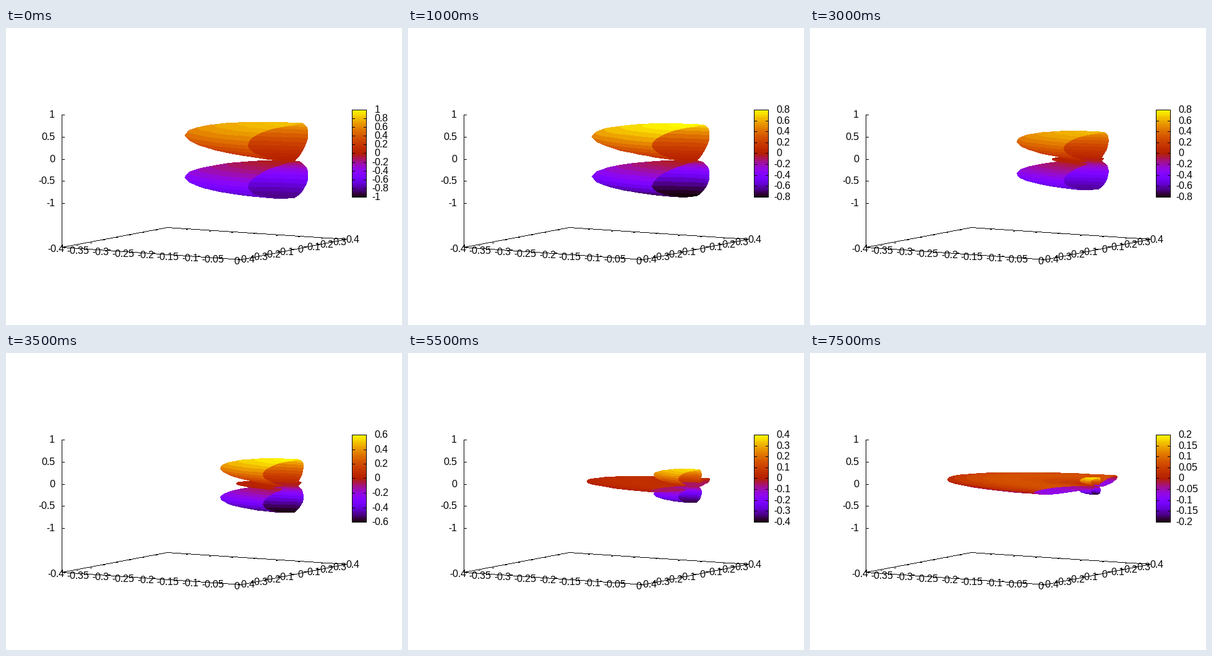
Write a matplotlib script that moves like this. It is 640 px wide and 480 px high and loops after 8 s.

```python
import numpy as np
import matplotlib.pyplot as plt
from matplotlib.animation import FuncAnimation
from matplotlib.collections import LineCollection, PolyCollection

W, H, DPI = 640, 480, 80
PX = 72 / DPI
FRAMES, PERIOD = 16, 40
BAR_X0, BAR_X1, BAR_TOP, BAR_BOT = 559, 582, 132, 273

plt.rcParams["font.family"] = "Liberation Sans"
plt.rcParams["font.size"] = 16 * PX
plt.rcParams["text.hinting"] = "no_autohint"
plt.rcParams["text.hinting_factor"] = 1

fig = plt.figure(figsize=(W / DPI, H / DPI), dpi=DPI, facecolor="white")
ax = fig.add_axes([0, 0, 1, 1])
ax.axis("off")


def project(x, y, z):
    """Orthographic view of x in [-0.4, 0], y in [-0.4, 0.4], base at z = -2."""
    u, v = (x + 0.4) / 0.4, (y + 0.4) / 0.8
    return np.stack([90 + 290 * u + 170 * v,
                     354.4 + 19.4 * u - 32.7 * v - 71.33 * (z + 2)], axis=-1)


def palette(g):
    g = np.clip(g, 0, 1)
    return np.stack([np.sqrt(g), g ** 3,
                     np.clip(np.sin(2 * np.pi * g), 0, 1)], axis=-1)


def dots(lines):
    """One short dash per pixel along each line, for crisp stepped strokes."""
    pts = []
    for a, b in np.round(lines):
        n = int(np.abs(b - a).max()) + 1
        pts.append(np.round(a + np.linspace(0, 1, n)[:, None] * (b - a)))
    return np.concatenate(pts)[:, None, :] + [[0.3, 0.5], [0.7, 0.5]]


def strokes(lines):
    return ax.add_collection(LineCollection(
        dots(lines), colors="black", linewidths=0.2 * PX,
        antialiased=False, snap=False, zorder=3))


def label(value, x, y, align):
    """Number with a leading blank in place of a missing minus sign."""
    text = f"{value:g}"
    if value >= 0:
        x += {"left": 4.4, "center": 2.2, "right": 0}[align]
    return ax.text(x, y, text, ha=align, va="baseline")


def outline(corners):
    return [[p, corners[(i + 1) % 4]] for i, p in enumerate(corners)]


def draw_axes():
    corners = [project(x, y, -2) for x, y in
               ((-0.4, -0.4), (0, -0.4), (0, 0.4), (-0.4, 0.4))]
    lines = outline(corners)
    lines.append([corners[0], project(-0.4, -0.4, 1)])

    for x in np.arange(-8, 1) * 0.05:
        for y, step in ((-0.4, 5), (0.4, -5)):
            p = project(x, y, -2)
            lines.append([p, p + [step, -0.19 * step]])
        px, py = project(x, -0.4, -2)
        label(round(x, 2), px - 9.5, py + 8, "center")

    for y in np.arange(-4, 5) * 0.1:
        for x, step in ((0, -5), (-0.4, 5)):
            p = project(x, y, -2)
            lines.append([p, p + [step, 0.07 * step]])
        px, py = project(0, y, -2)
        label(round(y, 1), px + 8.5, py + 5.5, "center")

    for z in (-1, -0.5, 0, 0.5, 1):
        p = project(-0.4, -0.4, z)
        lines.append([p, p + [4, 0]])
        label(z, 79, p[1] + 5, "right")
    strokes(np.array(lines))


# Spherical grid, 9 degree meridians ordered from back to front
phi = np.radians(np.arange(99, 262, 9))[:, None]
theta = np.radians(np.linspace(180, 0, 42))[None, :]
q = np.sqrt(5) * (3 * np.cos(theta) ** 2 - 1) / 2


def quads(grid):
    return np.stack([grid[:-1, :-1], grid[1:, :-1],
                     grid[1:, 1:], grid[:-1, 1:]], axis=2)


def surface(c):
    """Density |Y00 + Y20 exp(i t)|^2 as radius, with c = cos t."""
    r = (1 + q ** 2 + 2 * q * c) / (4 * np.pi)
    rho = r * np.sin(theta)
    z = r * np.cos(theta) + 0 * phi
    pts = project(rho * np.cos(phi), rho * np.sin(phi), z)
    height = quads(z).mean(axis=2).ravel()
    return quads(np.round(pts) + 0.5).reshape(-1, 4, 2), height, z.max()


draw_axes()
body = ax.add_collection(PolyCollection(
    [], linewidths=0, edgecolors="none", antialiased=False, snap=False))

ax.imshow(palette(np.linspace(1, 0, 128))[:, None, :], interpolation="nearest",
          extent=(BAR_X0, BAR_X1 + 1, BAR_BOT + 1, BAR_TOP), aspect="auto")
frame = np.array(outline([(BAR_X0, BAR_TOP), (BAR_X1, BAR_TOP),
                          (BAR_X1, BAR_BOT), (BAR_X0, BAR_BOT)]))
strokes(frame)
bar_ticks = strokes(frame)
bar_labels = [ax.text(0, 0, "", va="baseline") for _ in range(11)]

ax.set_xlim(0, W)
ax.set_ylim(H, 0)


def bar_scale(peak):
    step = 0.2 if peak > 0.5 else 0.1 if peak > 0.25 else 0.05
    return int(np.ceil(peak / step)), step


def update(k):
    polys, height, peak = surface(np.cos(2 * np.pi * (k + 1) / PERIOD))
    n, step = bar_scale(peak)
    body.set_verts(polys)
    body.set_facecolor(palette(0.5 + height / (2 * n * step)))

    ticks = []
    for text in bar_labels:
        text.set_text("")
    for i, text in zip(range(-n, n + 1), bar_labels):
        y = round(BAR_BOT - (BAR_BOT - BAR_TOP) * (i + n) / (2 * n))
        text.set_text(f"{i * step:g}")
        text.set_position((591 if i < 0 else 595.4, y + 5))
        for x, d in ((BAR_X0, 4), (BAR_X1, -4)):
            ticks.append([(x, y), (x + d, y)])
    bar_ticks.set_segments(dots(np.array(ticks)))
    return [body, bar_ticks, *bar_labels]


anim = FuncAnimation(fig, update, frames=FRAMES, interval=500,
                     repeat=True, repeat_delay=0, blit=False)
plt.show()
```
